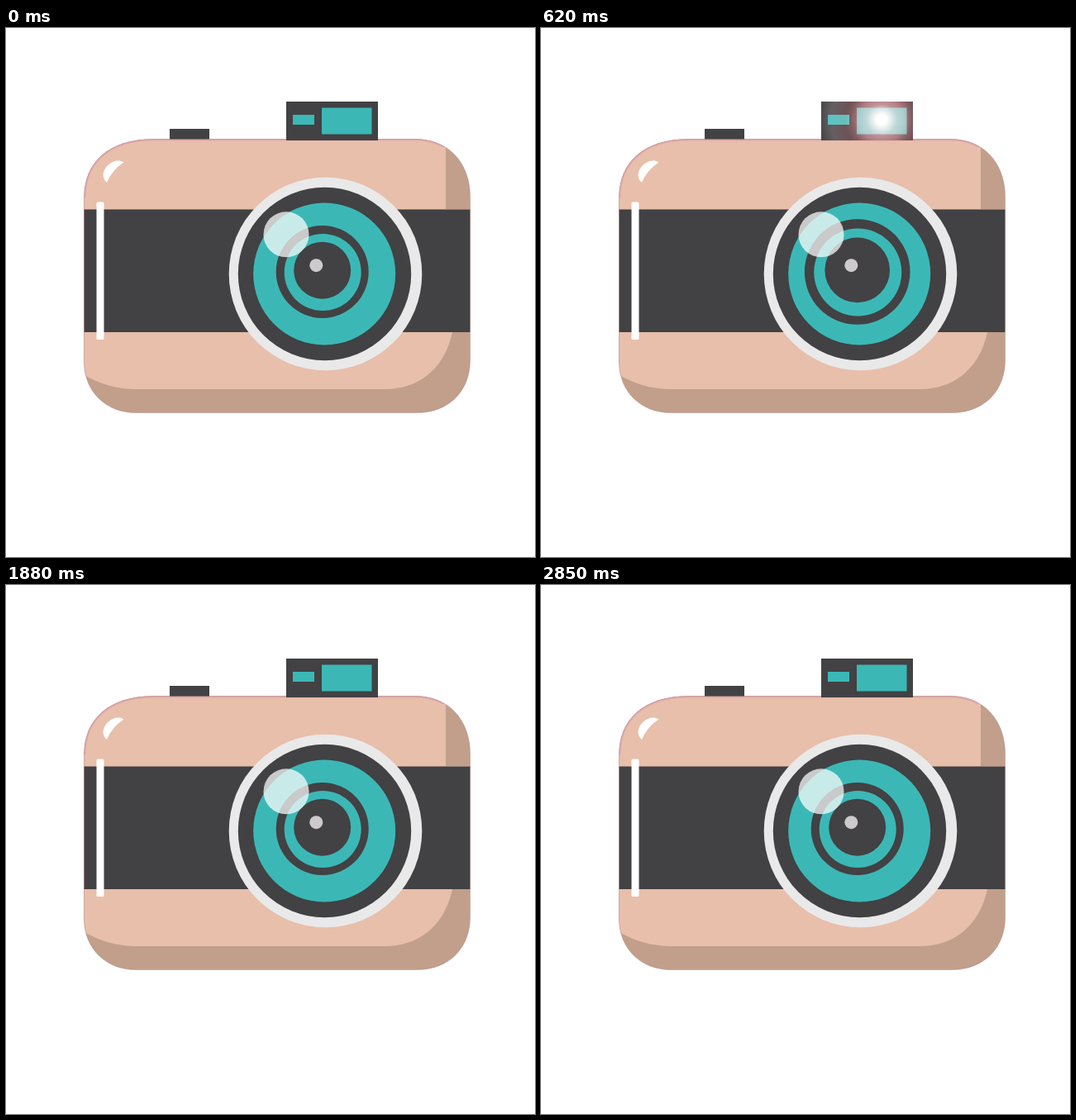
An HTML page for the animation above (2.89 s loop, 640 by 640 pixels).

```html
<!DOCTYPE html>
<html lang="en">
<head>
<meta charset="utf-8">
<title>Camera flash</title>
<style>
  html, body { margin: 0; width: 100%; height: 100%; overflow: hidden; background: #fff; }
  svg { display: block; width: 100vw; height: 100vh; }
  #glow { mix-blend-mode: screen; }
</style>
</head>
<body>
<svg viewBox="0 0 640 640">
  <defs>
    <clipPath id="bodyShape">
      <path id="outline" d="M94.5 205C94.5 163 124 134.5 178 134.5H496C536 134.5 561.5 164 561.5 204V402C561.5 440 535 465.5 497 465.5H157C121 465.5 94.5 440 94.5 404Z"/>
    </clipPath>
    <clipPath id="flashArea">
      <path d="M198 122H246V134.5H198ZM339 89H450V136H339Z"/>
    </clipPath>
    <radialGradient id="light" gradientUnits="userSpaceOnUse" cx="412" cy="111" r="215">
      <stop offset="0" stop-color="#fff"/>
      <stop offset=".08" stop-color="#fdfafa"/>
      <stop offset=".165" stop-color="#d2b0b4"/>
      <stop offset=".24" stop-color="#a96f76"/>
      <stop offset=".35" stop-color="#925056"/>
      <stop offset=".47" stop-color="#552628"/>
      <stop offset=".56" stop-color="#381619"/>
      <stop offset=".78" stop-color="#2e2829"/>
      <stop offset="1" stop-color="#000"/>
    </radialGradient>
  </defs>

  <g clip-path="url(#bodyShape)">
    <rect x="94" y="134" width="468" height="332" fill="#c29f8b"/>
    <path fill="#e8bfaa" d="M90 130H532V219H562V368H540C531 410 502 437 458 437H155Q120 436 90 417Z"/>
    <path fill="none" stroke="#e0a9ab" stroke-width="4" d="M94.5 205C94.5 163 124 134.5 178 134.5H496Q514 134.5 530 143"/>
    <rect x="94" y="219.5" width="468" height="148.5" fill="#424143"/>
  </g>
  <use href="#outline" fill="none" stroke="#9a7478" stroke-width=".6" stroke-opacity=".6"/>

  <path fill="#fff" d="M142.500 162.500C133 156 118 166 117.500 178Q118 184 122 187Q128 172 142.500 162.500Z"/>
  <rect x="109.500" y="210.500" width="9" height="166.500" rx="1.500" fill="#fff"/>

  <g fill="#424143">
    <rect x="198" y="122" width="48" height="12.500"/>
    <rect x="339" y="89" width="111" height="47"/>
  </g>
  <g fill="#3bb8b6">
    <rect x="347" y="105" width="26" height="12"/>
    <rect x="382" y="96.500" width="60.500" height="32"/>
  </g>
  <g id="glow" clip-path="url(#flashArea)">
    <rect x="190" y="85" width="265" height="55" fill="url(#light)"/>
  </g>

  <circle cx="386.500" cy="297.500" r="116.800" fill="#e9e9ea"/>
  <circle cx="385.500" cy="297.500" r="104.700" fill="#424143"/>
  <circle cx="385.200" cy="297.500" r="86" fill="#3bb8b6"/>
  <g id="iris">
    <circle r="56" fill="#424143"/>
    <circle cx=".5" cy=".5" r="46.500" fill="#3bb8b6"/>
    <circle cy="-1.800" r="34.500" fill="#424143"/>
  </g>
  <circle cx="339" cy="249.800" r="27.500" fill="#fff" fill-opacity=".72"/>
  <circle cx="375.300" cy="287.200" r="8" fill="#cccacc"/>
</svg>
<script>
  const LOOP = 2890, FPS = 26, LAST_STEP = 74, PULSE = 790;
  const iris = document.getElementById('iris');
  const glow = document.getElementById('glow');
  const light = document.getElementById('light');

  // Eased rise and fall: 0 -> 1 -> 0 over one pulse.
  const pulse = t => t < PULSE ? Math.sin(Math.PI * t / PULSE) ** 2 : 0;

  // Motion is held at 26 steps per second, on 10 ms boundaries.
  function stepTime(t) {
    const tick = Math.floor(t / 10) * 10;
    return Math.min(LAST_STEP, Math.floor((tick + 5) * FPS / 1000)) * 1000 / FPS;
  }

  function render(t) {
    const p = pulse(stepTime(t));
    const spread = (p / 0.89) ** 1.3;
    iris.setAttribute('transform', `translate(382.700 295) scale(${1 + 0.342 * p})`);
    light.setAttribute('r', Math.max(0.01, 215 * spread));
    glow.setAttribute('opacity', Math.min(1, spread * 3));
  }

  const start = performance.now();
  function tick() {
    render((performance.now() - start) % LOOP);
    requestAnimationFrame(tick);
  }
  tick();
</script>
</body>
</html>
```
